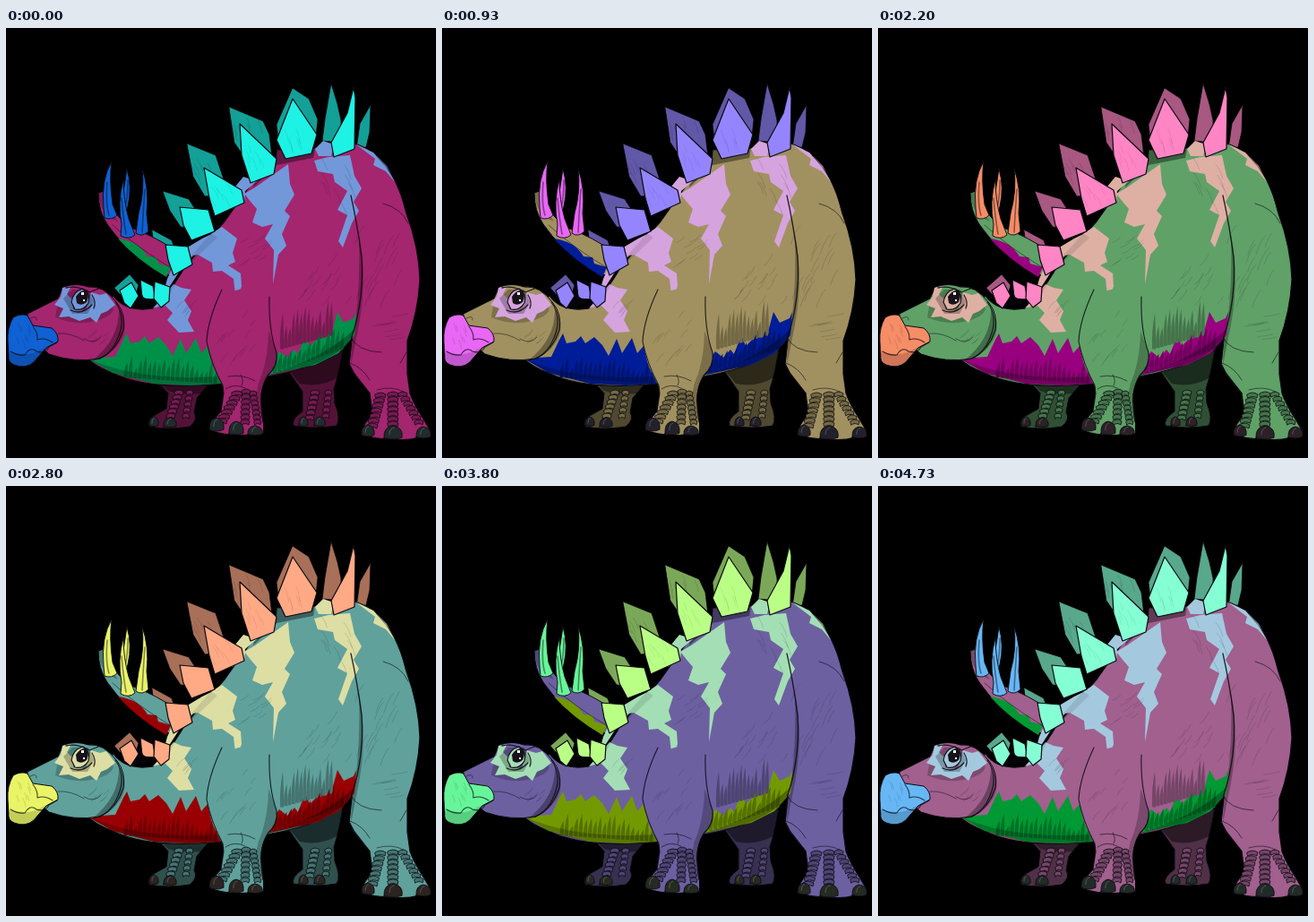
An HTML page that plays this animation: 480 px wide and 480 px high, repeating every 4.79 s.

```html
<!DOCTYPE html>
<html lang="en">
<head>
<meta charset="utf-8">
<title>Colour-cycling dinosaur</title>
<style>
html, body { margin: 0; width: 100%; height: 100%; overflow: hidden; background: #000; }
svg { display: block; width: 100vw; height: 100vh; }
path { stroke-linejoin: round; stroke-linecap: round; }
</style>
</head>
<body>
<svg id="art" viewBox="0 0 480 480"></svg>
<script>
const art = document.getElementById('art');
const INK = '#0b0910';

function add(d, fill, line = 0, ink = INK, alpha = 1) {
  const p = document.createElementNS('http://www.w3.org/2000/svg', 'path');
  p.setAttribute('d', d);
  p.style.cssText = `fill:${fill};stroke:${line ? ink : 'none'};stroke-width:${line};opacity:${alpha}`;
  art.append(p);
}
const tint = name => `var(--${name})`;
const poly = (pts, name, line = 0) => add(`M${pts}Z`, tint(name), line);
const stroke = (d, w = 1, alpha = .85, ink = INK) => add(d, 'none', w, ink, alpha);
const shade = (d, alpha) => add(d, '#000', 0, INK, alpha);

let seed = 11;
const rnd = () => (seed = seed * 16807 % 2147483647) / 2147483647;

// loose pencil strokes scattered inside a box
function hatch(x, y, w, h, n, dx, dy, alpha = .23) {
  for (let i = 0; i < n; i++) {
    const a = x + rnd() * w, b = y + rnd() * h, s = .6 + rnd() * .6;
    stroke(`M${a} ${b}q${dx * s * .6} ${dy * s * .3} ${dx * s} ${dy * s}`, .6, alpha);
  }
}
// tapered dark streaks hanging along a sloped line
function fringe(x0, y0, x1, y1, n, len, name, lean) {
  for (let i = 0; i < n; i++) {
    const u = (i + .5) / n, x = x0 + (x1 - x0) * u, y = y0 + (y1 - y0) * u;
    const h = len * (.55 + rnd() * .7);
    add(`M${x - 2} ${y}q-1 ${-h * .5} ${lean} ${-h}q${2 - lean * .3} ${h * .5} ${4 - lean} ${h}Z`, tint(name));
  }
}
function claw(x, y, w, h) {
  add(`M${x - w} ${y + h}q-1 ${-h * 1.8} ${w} ${-h * 2}q${w * 1.2} ${h * .3} ${w} ${h * 1.9}q${-w} ${h * .5} ${-w * 2} .1Z`, tint('c'), .8);
  stroke(`M${x - w * .4} ${y + h * .4}q0 ${-h} ${w * .5} ${-h * 1.1}`, .7, .3, '#fff');
}
// rows of foot scales running from one point to another
function scutes(x0, y0, x1, y1, n, w) {
  for (let i = 0; i < n; i++) {
    const u = i / (n - 1), x = x0 + (x1 - x0) * u, y = y0 + (y1 - y0) * u;
    add(`M${x - w} ${y}q${w} -4 ${w * 2} 0l-1 4q${1 - w} -3 ${2 - w * 2} 0Z`, tint('bm'), .8);
  }
}

// rear plates
[
  '163,225 185,237 188,246 185,268 170,258 165,242',
  '175,182 204,191 211,202 214,224 195,222 183,204',
  '202,129 234,142 243,169 240,186 222,188 209,166',
  '249,88 287,104 294,119 297,144 270,150 255,128',
  '320,67 338,79 348,102 346,122 304,125 302,108',
  '363,62 370,85 374,103 374,128 353,126 356,102',
  '407,86 406,116 402,133 391,135 395,107',
  '121,290 138,275 148,287 145,298 130,300'
].forEach(p => poly(p, 'ld', .8));
hatch(207, 140, 22, 30, 7, 6, 13);
hatch(253, 98, 30, 20, 7, 4, 12);

// tail and its spikes
add('M103 184L109 182Q115 202 137 222Q165 231 203 257L186 277L176 274Q132 248 113 219Q103 204 103 184Z', tint('b'), 1);
add('M125 235Q148 238 158 255L168 256L170 263L184 267L179 278Q145 258 125 235Z', tint('g'));
shade('M103 184L109 182Q112 199 125 216Q104 208 103 184Z', .25);
stroke('M119 220Q145 244 183 267', 1, .5);
function spike(d, edge) {
  add(d, tint('k'), .9);
  stroke(edge, 1.6, .45);
}
spike('M118 149Q115 169 119 197L124 209Q118 215 110 212L109 201Q106 169 118 149Z', 'M113 172Q111 197 115 209');
spike('M135 157Q141 178 136 199L134 207L127 202Q132 181 135 157Z', 'M136 170Q136 190 133 200');
spike('M131 169Q131 192 137 213L144 231Q137 237 128 232L129 219Q124 195 131 169Z', 'M129 190Q131 213 134 230');
spike('M152 157Q160 179 157 207L159 227Q152 234 145 229L148 207Q155 182 152 157Z', 'M155 180Q153 207 152 228');

// far legs
add('M166 391L232 391L213 413L210 429Q215 437 205 445Q181 449 160 445Q157 440 163 434L179 425L181 408Z', tint('bd'), 1);
add('M312 378L377 351Q373 382 366 403L367 419Q374 436 369 444Q345 448 321 444Q318 437 331 428L331 406Z', tint('bd'), 1);
shade('M166 391L232 391L218 408Q195 410 181 405Z', .4);
shade('M312 378L377 351L371 390Q350 402 328 397Z', .45);
scutes(193, 406, 184, 432, 6, 5);
scutes(205, 406, 201, 432, 5, 4);
scutes(345, 406, 339, 434, 6, 5);
scutes(360, 406, 357, 432, 5, 4);
claw(165, 439, 5, 5); claw(183, 440, 7, 5);
claw(332, 439, 5, 5); claw(350, 439, 6, 5);

// torso, near legs and neck
add('M120 299Q134 318 164 313Q180 300 199 268Q222 240 244 216L274 174L301 151L302 136L345 134' +
  'Q382 118 411 140Q436 160 447 207Q461 245 462 281Q460 317 448 349L448 386L451 408Q456 421 465 435L474 450' +
  'Q458 462 433 459Q407 459 399 453L400 443L409 430L406 408L388 386L383 375L386 347Q362 377 292 389' +
  'Q282 403 285 419L287 440L287 452Q252 457 229 449L229 440L240 428L243 404L240 397Q158 405 119 385Q102 379 91 369L80 330Z', tint('b'), 1.2);
shade('M386 347Q396 308 394 230Q405 285 391 346L385 377Z', .28);
shade('M302 136Q325 128 345 134L343 145L302 153L276 178L278 166Z', .4);

// light markings
[
  '164,313 187,286 196,290 207,292 199,304 207,316 203,326 210,339 193,340 180,326 186,318 177,309',
  '174,302 198,265 221,242 229,230 219,235 199,247 190,258 180,280',
  '230,229 241,222 258,235 253,251 256,261 248,265 262,274 263,288 257,306 254,280 241,271 231,272 230,262 214,253 204,255',
  '266,185 278,178 315,152 317,174 322,186 311,204 317,210 308,230 313,243 304,253 298,286 299,248 289,235 298,219 286,222 275,217 280,202 274,195',
  '344,148 360,144 384,142 389,165 397,179 388,194 394,204 386,218 376,245 371,238 381,209 370,203 381,182 367,172 365,163 348,160',
  '345,135 354,126 366,130 363,143 349,143',
  '391,130 410,139 425,154 434,172 424,160 410,153 412,146',
  '251,183 265,166 280,171 267,182 266,195 252,202'
].forEach(p => poly(p, 'p'));
shade('M198 264L229 229L236 234L198 270L181 300L174 302Z', .1);

// belly colour with ragged upper edge
poly('91,369 122,367 131,348 135,341 139,352 149,350 155,344 160,352 170,345 179,354 186,366 195,347 201,363 212,346 218,363 225,355 230,376 240,397 205,399 165,397 119,385', 'g');
poly('290,388 293,378 305,361 314,368 322,359 326,364 334,343 339,355 346,348 351,336 357,346 365,335 370,317 377,329 388,324 391,317 389,343 371,363 345,376', 'g');
fringe(306, 359, 365, 343, 14, 33, 'bm', 3);
fringe(131, 390, 236, 397, 20, 21, 'gd', 4);
fringe(297, 386, 377, 358, 15, 22, 'gd', 5);
shade('M91 369Q151 395 238 389L240 397Q158 405 119 385Z', .22);
shade('M290 388Q355 369 389 336L386 347Q362 377 292 389Z', .3);

// near front leg over the belly
add('M239 302Q225 327 224 350Q228 374 242 399L243 408L240 428L229 441L229 449Q252 457 287 452L287 440L284 416Q284 400 292 388Q304 377 302 362Q292 339 294 301Q270 280 239 302Z', tint('b'));
stroke('M241 292Q225 326 224 350Q229 375 242 399L243 408L240 428L229 441M294 300Q293 338 302 362Q304 377 292 388Q281 405 287 440', 1.1);
stroke('M248 389Q264 386 278 394M245 403Q255 396 267 402M262 387Q266 394 263 399', 1, .6);
shade('M293 338L302 362Q304 377 292 388Q281 403 287 440L280 431Q276 407 286 386Q293 363 293 338Z', .24);

// hind leg
stroke('M385 187Q392 218 397 256Q400 302 386 345L383 375L389 386L406 408', 1.3);
stroke('M385 345Q392 361 419 362M384 374Q398 379 406 393M447 362L440 374M413 142Q438 166 447 207M421 196Q441 201 449 218', 1, .6);
stroke('M414 404Q430 399 444 406', 1, .55);
hatch(399, 218, 45, 75, 16, -11, 22);
hatch(326, 265, 54, 48, 16, 9, -12);
hatch(241, 306, 38, 62, 14, -8, 10);
hatch(352, 145, 30, 52, 9, 7, 14);
hatch(258, 235, 30, 35, 10, 13, -9);
hatch(407, 318, 25, 36, 7, 17, -3);
hatch(195, 294, 22, 23, 7, -8, 9);

// feet
scutes(258, 407, 241, 438, 7, 6);
scutes(268, 405, 267, 439, 7, 5);
scutes(276, 407, 281, 439, 7, 4);
scutes(418, 409, 409, 443, 7, 6);
scutes(432, 408, 432, 441, 7, 6);
scutes(443, 408, 461, 439, 7, 5);
claw(235, 442, 8, 7); claw(257, 446, 8, 7); claw(278, 449, 8, 5);
claw(404, 449, 7, 6); claw(432, 451, 10, 7); claw(466, 451, 8, 6);

// front plates
[
  '127,293 140,284 148,299 139,313 132,307',
  '150,281 164,288 167,303 152,302',
  '166,283 183,289 182,305 173,312 165,302',
  '178,242 203,244 208,264 187,276 181,259',
  '194,200 226,203 233,227 207,237 198,220',
  '221,156 263,181 266,195 233,210 227,190',
  '261,107 302,146 299,163 273,173 263,142',
  '320,79 347,119 341,140 312,146 302,125',
  '388,66 390,78 389,135 366,144 363,128 381,95'
].forEach(p => poly(p, 'l', 1.2));
add('M148 287L153 300L163 307L139 313L149 300Z', '#050409');
hatch(228, 171, 20, 20, 6, 7, 12, .13);
hatch(267, 130, 18, 22, 6, 5, 13, .13);
hatch(311, 112, 20, 15, 6, 4, 14, .13);

// head
add('M24 319L58 302L64 289Q78 284 92 289Q109 287 124 307Q134 320 131 337Q123 361 105 369Q76 374 48 364L30 348Z', tint('b'), 1);
shade('M57 311L89 319Q102 319 118 310Q123 315 113 322Q86 336 55 323Z', .22);
shade('M126 313Q139 334 126 352Q114 369 95 372Q127 348 126 313Z', .32);
poly('63,290 73,288 68,297 74,303 75,314 89,315 92,306 95,295 105,298 112,296 122,309 113,316 106,319 101,329 94,323 82,327 70,322 59,323 64,313 54,309 61,300', 'p');
shade('M64 302L74 292L92 292L98 306L91 319L74 319Z', .25);
add('M73 306Q75 294 86 291Q95 297 92 307Q86 316 77 314Z', tint('p'), 1.1);
add('M78 300Q83 292 89 293Q94 298 90 306Q84 311 79 307Z', '#171219');
add('M84 295h3v3h-3ZM86 303h2v2h-2Z', '#fff');
stroke('M67 290Q79 287 93 295L103 291M72 315Q85 321 96 309M96 298Q101 306 98 313', 1.3);
stroke('M122 306Q137 326 121 354Q114 365 104 369', 1.1);
stroke('M58 341Q73 340 87 349M87 347Q99 354 106 345M27 324Q35 320 34 326', .9, .55);
hatch(91, 341, 18, 12, 8, 8, -7);

// beak
add('M8 323Q17 318 24 321L30 332L51 335Q59 341 58 350L45 357Q36 367 31 373Q22 381 9 376Q2 373 3 365L2 350Q1 335 8 323Z', tint('k'), 1);
shade('M5 361Q19 367 33 362L55 351L45 358L31 373Q22 381 9 376Q2 371 5 361Z', .16);
stroke('M5 361Q13 366 21 365Q27 355 34 361Q44 364 48 356L57 351M30 333Q36 341 35 348Q43 345 52 351', 1.1, .75);
hatch(9, 329, 16, 25, 8, 3, 9, .22);

// hue, saturation, value
const vivid = { b: [325, .77, .64], p: [218, .47, .85], l: [176, .88, .95], g: [150, 1, .57], k: [215, .93, .83] };
const soft = { b: [17, .4, .63], p: [262, .26, .87], l: [219, .48, 1], g: [200, 1, .6], k: [266, .58, .96] };
const turns = [[-1, -60], [8, 0], [21, 62], [33, 110], [42, 159], [57, 235], [71, 300]];

function rgb(h, s, v) {
  const ch = n => {
    const q = (((n + h / 60) % 6) + 6) % 6;
    return Math.round(255 * v * (1 - s * Math.max(0, Math.min(q, 4 - q, 1))));
  };
  return `rgb(${ch(5)},${ch(3)},${ch(1)})`;
}
function turnAt(step) {
  const i = Math.max(1, turns.findIndex(t => t[0] >= step));
  const [a, x] = turns[i - 1], [b, y] = turns[i];
  return x + (y - x) * (step - a) / (b - a);
}
function paint(step) {
  const set = step ? soft : vivid, turn = step ? turnAt(step) : 0;
  const put = (name, key, dim = 1) => {
    const [h, s, v] = set[key];
    art.style.setProperty('--' + name, rgb(h + turn, s, v * dim));
  };
  for (const key in set) put(key, key);
  put('bm', 'b', .72);
  put('bd', 'b', .5);
  put('ld', 'l', .66);
  put('gd', 'g', .74);
  art.style.setProperty('--c', rgb(set.l[0] + turn, .25, .17));
}

const LOOP = 4790, STEPS = 72;
let shown = -1;
function frame(now) {
  const t = now % LOOP;
  let step = Math.min(STEPS - 1, Math.floor(t * 3 / 200) + 1);
  while (Math.round(step * 20 / 3) * 10 > t) step--;
  if (step !== shown) paint(shown = step);
  requestAnimationFrame(frame);
}
paint(0);
const start = performance.now();
requestAnimationFrame(() => frame(performance.now() - start));
</script>
</body>
</html>
```
